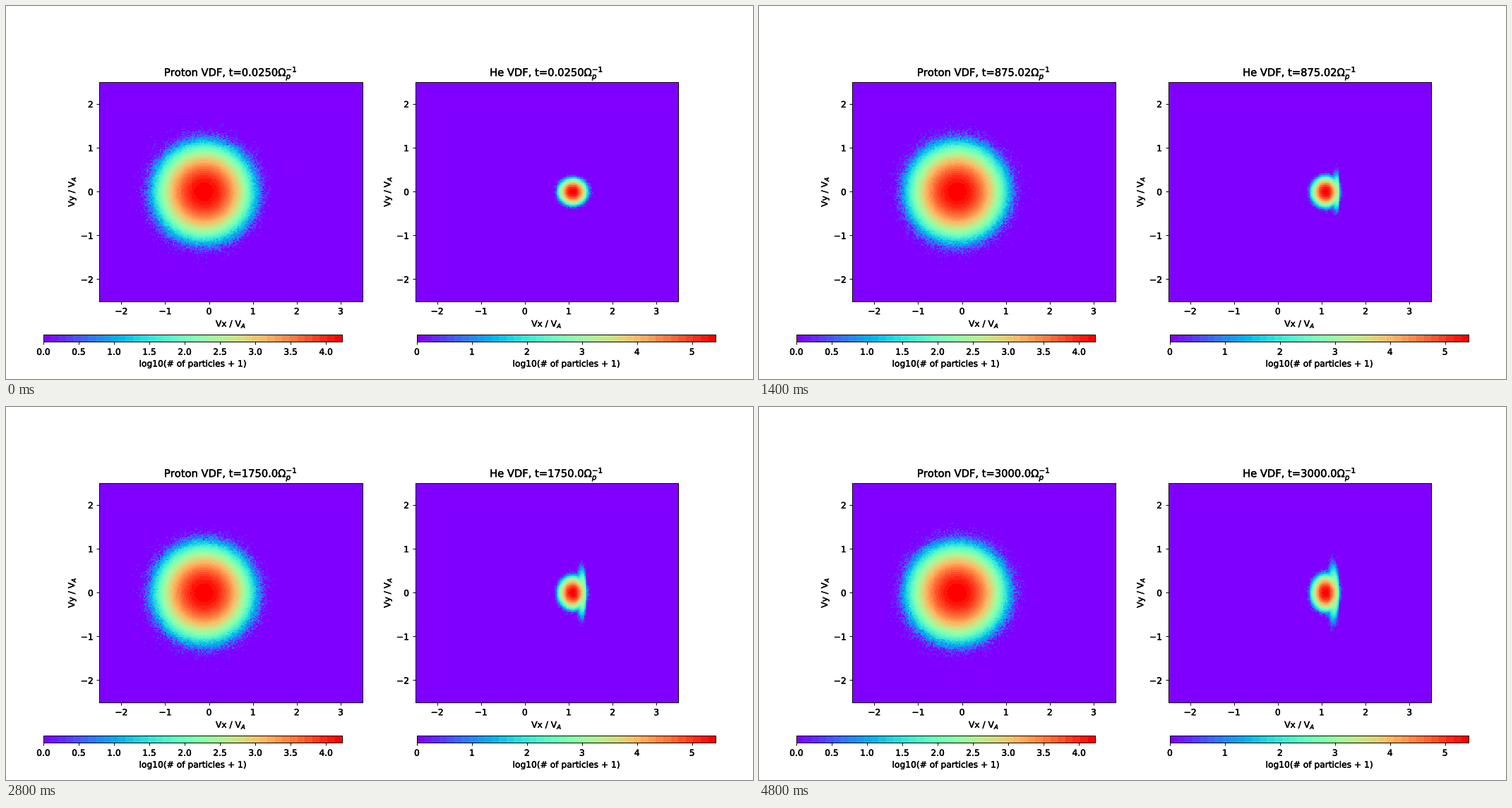
A matplotlib script for the animation above (5 s loop, 1058x529 px).

```python
import numpy as np
import matplotlib.pyplot as plt
from matplotlib.animation import FuncAnimation
from matplotlib.patheffects import withStroke

FRAMES, INTERVAL = 25, 200
STEP, START = 125, 0.025          # simulated time per frame, first output
BINS = 200
EXTENT = (-2.5, 3.5, -2.5, 2.5)
PROTON_MAX, HE_MAX = 4.23, 5.43   # log10 of the peak counts
BOLDER = [withStroke(linewidth=0.35, foreground="black")]

plt.rcParams.update({"font.family": "DejaVu Sans", "font.size": 10,
                     "axes.labelpad": 3})


def centers(lo, hi):
    edges = np.linspace(lo, hi, BINS + 1)
    return (edges[:-1] + edges[1:]) / 2


X, Y = np.meshgrid(centers(*EXTENT[:2]), centers(*EXTENT[2:]))


def gauss(log_peak, dx, sx, dy, sy):
    """2D Gaussian; sx is a (left, right) pair of widths."""
    sx = np.where(dx < 0, *sx)
    return 10 ** log_peak * np.exp(-(dx / sx) ** 2 / 2 - (dy / sy) ** 2 / 2)


def proton_density(t):
    return gauss(PROTON_MAX, X + 0.11, (0.313, 0.313), Y, 0.309)


def he_density(t):
    """Core heated across the field, plus a resonant wing growing along Vy."""
    u = t / 3000
    core = gauss(HE_MAX, X - 1.085, (0.084, 0.084 - 0.011 * min(1, 3 * u)),
                 Y, 0.077 + 0.028 * u ** 0.8)

    def at(*values):
        return np.interp(t, (0, 500, 1250, 1750, 2625, 3000), values)

    log_peak = at(0, 3.1, 3.3, 3.3, 3.3, 3.3)
    reach = at(0.1, 0.45, 0.62, 0.70, 0.78, 0.80)
    middle = at(1.36, 1.345, 1.335, 1.315, 1.295, 1.29) - 0.06 * Y ** 2
    left = at(0.03, 0.036, 0.04, 0.043, 0.049, 0.052)
    right = at(0.022, 0.022, 0.023, 0.026, 0.03, 0.031)
    spread = reach / np.sqrt(2 * np.log(10) * max(log_peak, 0.1))
    return core + gauss(log_peak, X - middle, (left, right), Y, spread)


def counts(density, t, seed):
    rng = np.random.default_rng(seed)
    return np.log10(rng.poisson(density(t)) + 1)


fig = plt.figure(figsize=(12, 6), dpi=88.17, facecolor="white")
cmap = plt.get_cmap("rainbow", 40)


def panel(left, bar_left, vmax, ticks):
    ax = fig.add_axes([left, 0.2088, 0.35227, 0.5874])
    im = ax.imshow(np.zeros((BINS, BINS)), origin="lower", extent=EXTENT,
                   aspect="auto", interpolation="nearest",
                   cmap=cmap, vmin=0, vmax=vmax)
    ax.set_xticks(range(-2, 4))
    ax.set_yticks(range(-2, 3))
    ax.set_xlabel("Vx / V$_A$")
    ax.set_ylabel("Vy / V$_A$")
    cax = fig.add_axes([bar_left, 0.1, 0.4, 0.02])
    bar = fig.colorbar(im, cax=cax, orientation="horizontal", ticks=ticks)
    bar.set_label("log10(# of particles + 1)")
    title = ax.set_title(" ", fontsize=12)
    for text in (title, ax.xaxis.label, ax.yaxis.label, cax.xaxis.label,
                 *ax.get_xticklabels(), *ax.get_yticklabels(),
                 *cax.get_xticklabels()):
        text.set_path_effects(BOLDER)
    return im, title


species = [
    ("Proton", proton_density,
     *panel(0.125, 0.05, PROTON_MAX, np.arange(0, 4.1, 0.5))),
    ("He", he_density,
     *panel(0.54773, 0.55, HE_MAX, np.arange(6))),
]


def update(i):
    t = START + STEP * i
    stamp = f"{t:.4f}"[:6]
    for k, (name, density, im, title) in enumerate(species):
        im.set_data(counts(density, t, 2 * i + k))
        title.set_text(rf"{name} VDF, t={stamp}$\Omega_p^{{-1}}$")
    return [artist for s in species for artist in s[2:]]


anim = FuncAnimation(fig, update, frames=FRAMES, interval=INTERVAL,
                     repeat=True, repeat_delay=0, blit=False)
plt.show()
```
